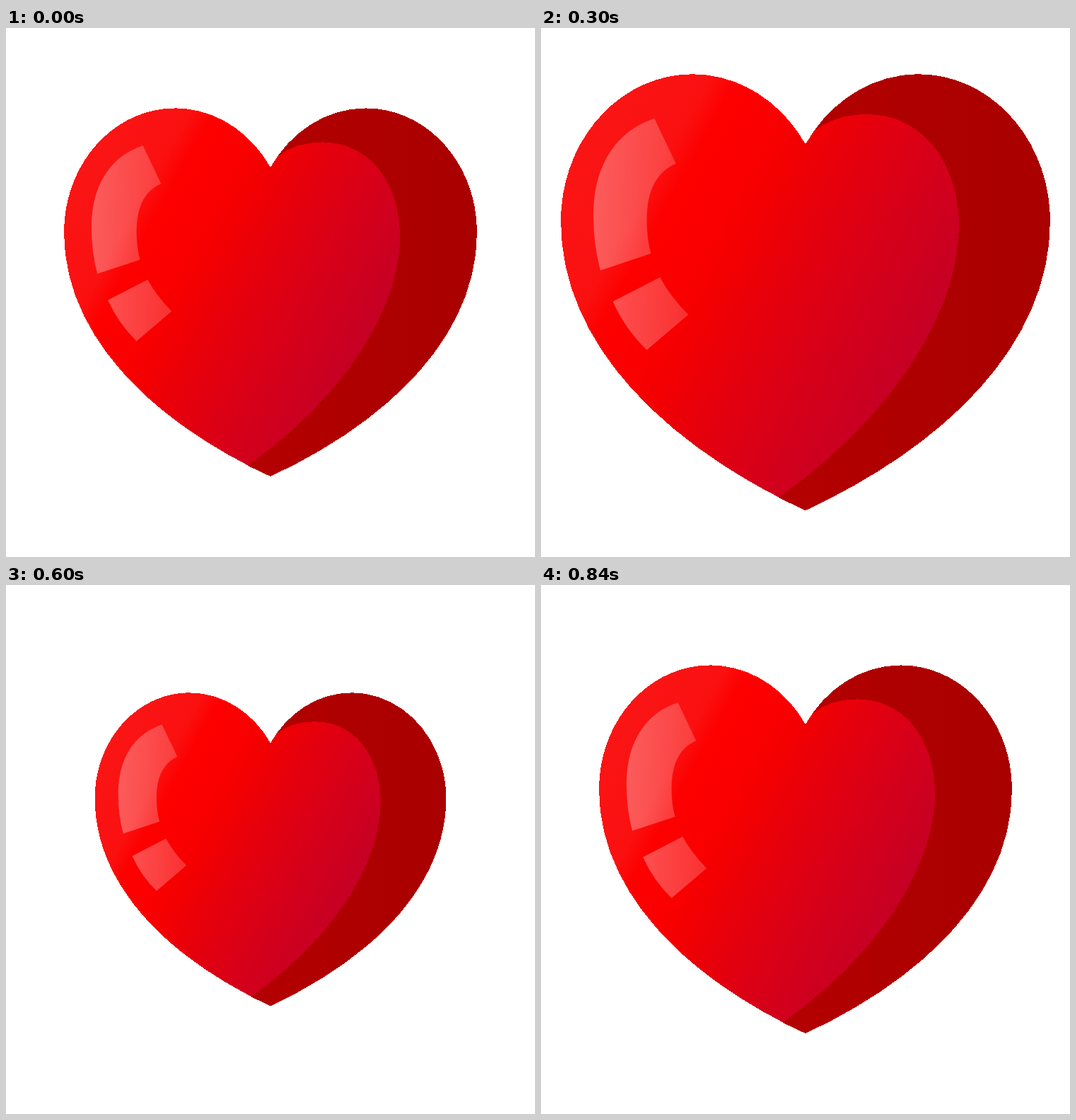
Recreate the animation shown at these times as an HTML page. Size 748x748 px, loop 960 ms.

```html
<!DOCTYPE html>
<html lang="en">
<head>
<meta charset="utf-8">
<title>Beating heart</title>
<style>
  html, body { margin: 0; height: 100%; overflow: hidden; background: #fff; }
  svg { display: block; width: 100vw; height: 100vh; }
</style>
</head>
<body>
<svg viewBox="0 0 748 748">
  <defs>
    <linearGradient id="red" gradientUnits="userSpaceOnUse" x1="87" y1="49" x2="612" y2="340">
      <stop offset="0" stop-color="#fa1616"/>
      <stop offset=".23" stop-color="#fb1010"/>
      <stop offset=".29" stop-color="#fd0000"/>
      <stop offset=".42" stop-color="#fa0000"/>
      <stop offset=".5" stop-color="#f20003"/>
      <stop offset=".58" stop-color="#e90009"/>
      <stop offset=".77" stop-color="#d80018"/>
      <stop offset="1" stop-color="#c50025"/>
    </linearGradient>
    <linearGradient id="dark">
      <stop offset="0" stop-color="#b40000"/>
      <stop offset="1" stop-color="#a90000"/>
    </linearGradient>
    <linearGradient id="gloss">
      <stop offset="0" stop-color="#fff" stop-opacity=".31"/>
      <stop offset="1" stop-color="#fff" stop-opacity=".19"/>
    </linearGradient>
  </defs>
  <g id="heart">
    <path fill="url(#red)" shape-rendering="crispEdges" d="M374 160C340 100 280 59 211 59C106 59 21 154 21 271C21 448 171 594 374 688.5
      C577 594 727 448 727 271C727 154 642 59 537 59C468 59 408 100 374 160Z"/>
    <path fill="url(#dark)" shape-rendering="crispEdges" d="M374 160C408 100 468 59 537 59C642 59 727 154 727 271C727 448 577 594 374 688.5
      L335 670C490 560 595 410 595.5 278C595.5 190 545 117 463 117C433 117 405 125 385 142.6Z"/>
    <path fill="url(#gloss)" d="M156 123L187 188C159 200 145 227 145 270Q145 296 151 318L78 342Q68 305 68 262C68 192 100 141 156 123Z"/>
    <path fill="url(#gloss)" d="M164 352Q179 380 205 406L145 457Q114 427 96 387Z"/>
  </g>
</svg>
<script>
  const heart = document.getElementById('heart');
  const LOOP = 960, STEP = 60, FULL = 353;
  // [time in ms, half width of the heart]
  const keys = [[0, 292], [253, 353], [475, 292], [668, 231], [840, 292], [LOOP, 292]];
  const ease = u => u * u * (3 - 2 * u);

  function halfWidth(t) {
    const i = keys.findIndex(([time]) => time > t);
    const [t0, a] = keys[i - 1], [t1, b] = keys[i];
    return a + (b - a) * ease((t - t0) / (t1 - t0));
  }

  function draw(now) {
    const t = Math.floor(now % LOOP / STEP) * STEP;
    const scale = halfWidth(t) / FULL;
    heart.setAttribute('transform', `translate(374 374) scale(${scale}) translate(-374 -374)`);
    requestAnimationFrame(draw);
  }
  draw(performance.now());
</script>
</body>
</html>
```
